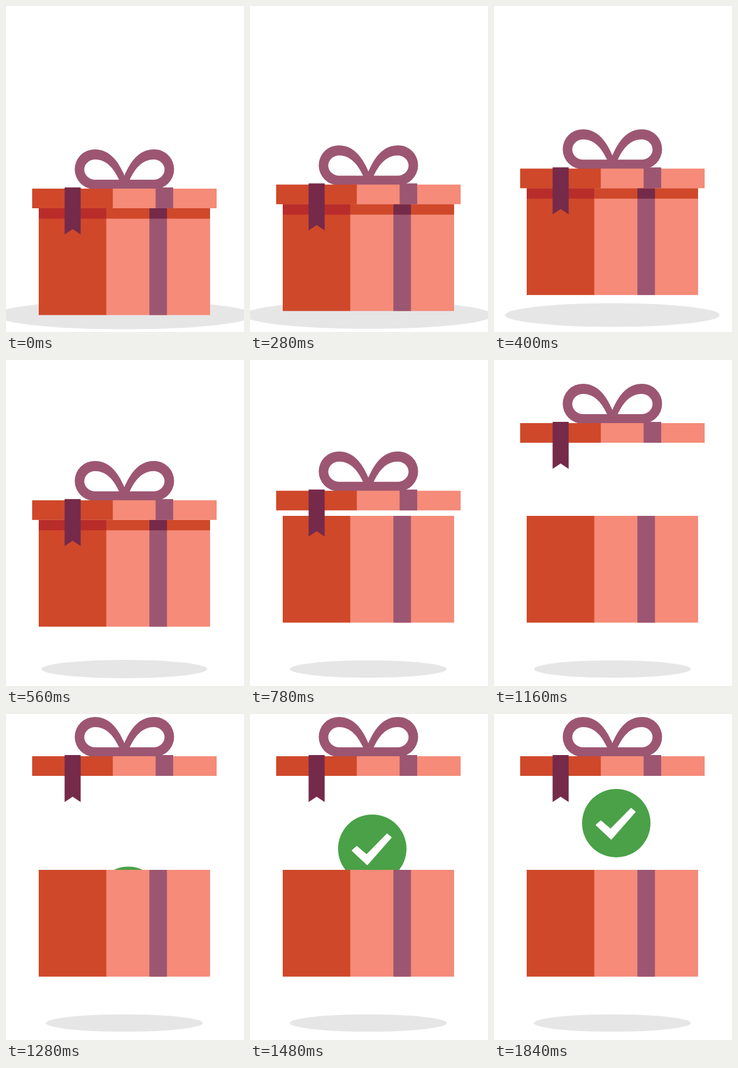
Recreate the animation shown at these times as an HTML page. Size 400 by 548 pixels, loop 2.64 s.

```html
<!DOCTYPE html>
<html lang="en">
<head>
<meta charset="utf-8">
<title>Gift box</title>
<style>
  html, body { margin: 0; width: 100%; height: 100%; overflow: hidden; background: #fff; }
  svg { display: block; width: 100%; height: 100%; }
  .red { fill: #cf482a; }
  .deep { fill: #b82d2a; }
  .pink { fill: #f58b78; }
  .mauve { fill: #9c5672; }
  .plum { fill: #752a4a; }
</style>
</head>
<body>
<svg viewBox="0 0 400 548">
  <g transform="translate(199 519.5)">
    <ellipse id="shadow" rx="217" ry="24" fill="#e6e6e6"/>
  </g>
  <g id="gift">
    <g id="badge">
      <circle cx="205.5" cy="261.5" r="57.5" fill="#4aa147"/>
      <path d="M179.5 258 196 272 230.500 237 237 242.500 197 288 172 264.500Z"
            fill="#fff" stroke="#fff" stroke-width="2" stroke-linejoin="round"/>
    </g>

    <rect class="red" x="55" y="340" width="114" height="179.500"/>
    <rect class="pink" x="168.500" y="340" width="174.500" height="179.500"/>
    <rect class="mauve" x="241" y="340" width="29.500" height="179.500"/>
    <g id="shade">
      <rect class="deep" x="55" y="340" width="114" height="17.500"/>
      <rect class="red" x="168.500" y="340" width="174.500" height="17.500"/>
      <rect class="plum" x="241" y="340" width="29.500" height="17.500"/>
    </g>

    <g id="lid">
      <path class="mauve" fill-rule="evenodd"
            d="M199 285C188 259 173 241 149 241A33.500 33.500 0 0 0 149 308H249A33.500 33.500 0 0 0 249 241C225 241 210 259 199 285Z
               M190 292H150A18.500 17 0 0 1 150 258C170 258 182 275 190 292Z
               M208 292H248A18.500 17 0 0 0 248 258C228 258 216 275 208 292Z"/>
      <rect class="red" x="44" y="307" width="136" height="33"/>
      <rect class="pink" x="179.500" y="307" width="174.500" height="33"/>
      <rect class="mauve" x="251.500" y="305" width="29.500" height="35"/>
      <path class="plum" d="M98.500 305h27v79l-13.500-9-13.500 9z"/>
    </g>
  </g>
</svg>
<script>
  const LOOP = 2640, STEP = 40;
  const [shadow, gift, badge, shade, lid] =
    ['shadow', 'gift', 'badge', 'shade', 'lid'].map(id => document.getElementById(id));

  // Number of 40 ms steps taken since `start`, at most `count`.
  const steps = (t, start, count) =>
    Math.max(0, Math.min(count, Math.floor((t - start) / STEP) + 1));
  const smooth = p => p * p * (3 - 2 * p);
  const easeIn = p => p ** 1.3;
  const easeOut = p => 1 - (1 - p) ** 1.26;
  const moveY = (el, y) => el.setAttribute('transform', `translate(0 ${y})`);

  function draw(t) {
    const lift = smooth(steps(t, 240, 11) / 11);
    moveY(gift, -78 * lift);
    shadow.setAttribute('transform', `scale(${1 - 0.392 * lift})`);

    const opening = steps(t, 780, 4) / 4;
    const rising = steps(t, 1040, 7) / 7;
    moveY(lid, -56 * easeIn(opening) - 102 * easeOut(rising));
    shade.setAttribute('visibility', opening ? 'hidden' : 'visible');

    // The badge pauses twice on its way up.
    const reveal = steps(t, 1240, 7) + steps(t, 1620, 2) + steps(t, 1800, 2);
    moveY(badge, 143 * (1 - smooth(reveal / 11)));
  }

  const start = performance.now();
  function tick() {
    draw((performance.now() - start) % LOOP);
    requestAnimationFrame(tick);
  }
  tick();
</script>
</body>
</html>
```
